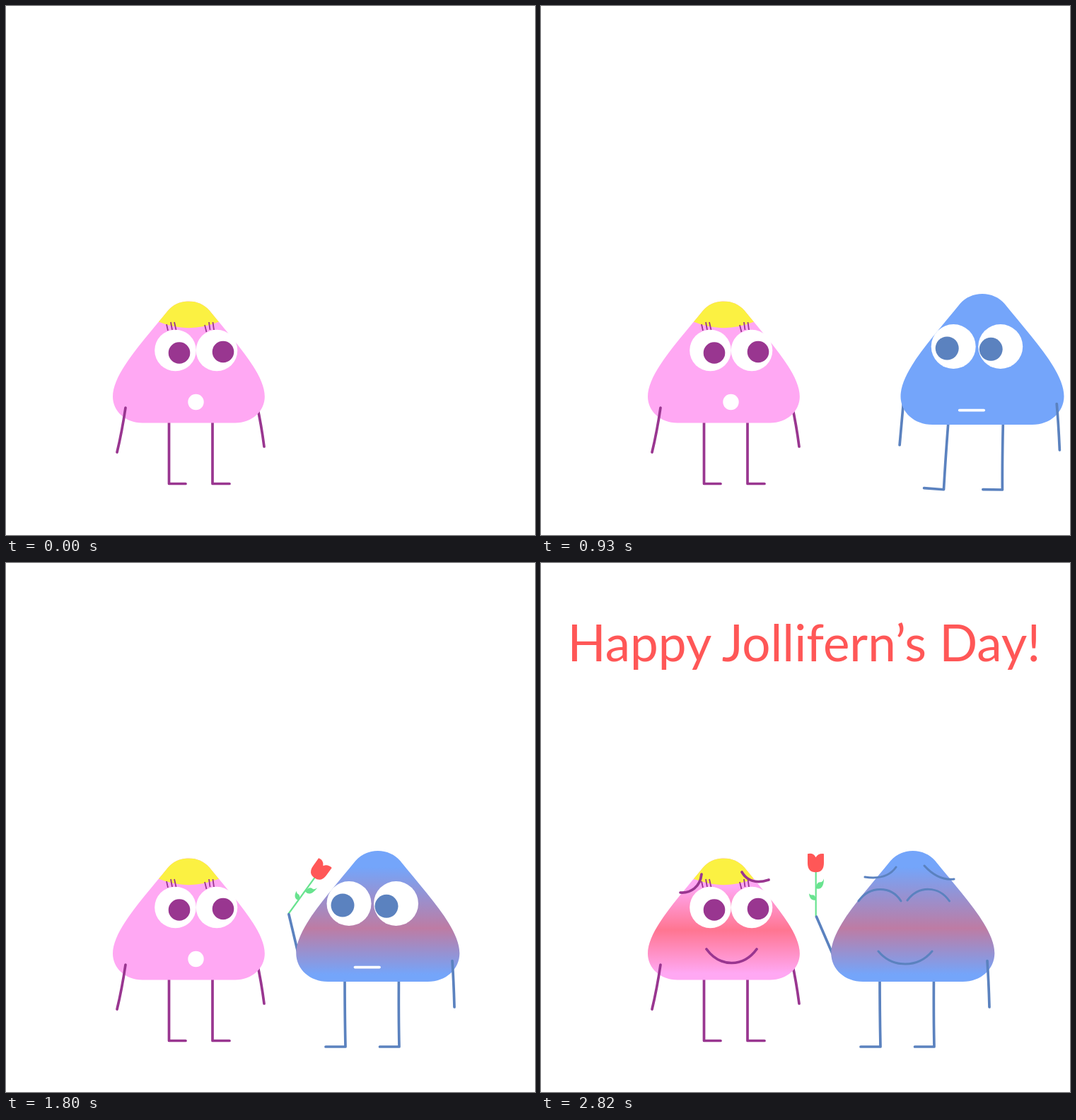
An HTML page for the animation above (4410 ms loop, 748x748 px).

```html
<!DOCTYPE html>
<html lang="en">
<head>
<meta charset="utf-8">
<title>Two friends and a flower</title>
<style>
  html, body { margin: 0; height: 100%; overflow: hidden; background: #fff; }
  svg { display: block; width: 100vw; height: 100vh; }
  .line { fill: none; stroke-width: 3.7; stroke-linecap: round; stroke-linejoin: round; }
  .purple { stroke: #993690; }
  .navy { stroke: #5b82bf; }
  .thin { stroke-width: 3; }
  text { font: 400 71px Lato, sans-serif; fill: #ff5757; text-anchor: middle; }
  stop { stop-color: #ff5757; }
</style>
</head>
<body>
<svg viewBox="0 0 748 748">
  <defs>
    <path id="body" d="M115.5 407C128 407 139 412 147 421C184 467 231 516 231 552C231 574 212 592 186 592H45C19 592 0 574 0 552C0 516 47 467 84 421C92 412 103 407 115.5 407Z"/>
    <clipPath id="bodyClip"><use href="#body"/></clipPath>
    <linearGradient id="blueGlow" gradientUnits="userSpaceOnUse" x1="0" y1="430" x2="0" y2="582">
      <stop offset="0" stop-opacity="0"/><stop offset=".57"/><stop offset="1" stop-opacity="0"/>
    </linearGradient>
    <linearGradient id="pinkGlow" gradientUnits="userSpaceOnUse" x1="0" y1="450" x2="0" y2="582">
      <stop offset="0" stop-opacity="0"/><stop offset=".5"/><stop offset="1" stop-opacity="0"/>
    </linearGradient>
  </defs>

  <text id="greeting" x="372" y="139">Happy Jollifern’s Day!</text>

  <g id="pink">
    <path class="line purple" d="M355 565Q361 592 365 623M230.5 580V675.5H254M292 580V675.5H316"/>
    <g transform="translate(151 417.5) scale(.93) translate(0 -407)">
      <use href="#body" fill="#ffa8f3"/>
      <use id="pinkBlush" href="#body" fill="url(#pinkGlow)"/>
      <path clip-path="url(#bodyClip)" fill="#fbf142" d="M0 400H231V438H162Q115.5 457 69 438H0Z"/>
    </g>
    <g fill="#fff"><circle cx="239.5" cy="487" r="29.3"/><circle cx="298" cy="487" r="29.3"/></g>
    <g fill="#993690"><circle cx="245" cy="490.5" r="15.3"/><circle cx="307" cy="489" r="15.3"/></g>
    <path class="purple" stroke-width="1.8" d="M227 450L229 459M233 447L235 458M238 447L240.5 458M281 451L283.5 461M287 447L288.5 458M292.5 447L294 458"/>
    <path class="line purple" d="M169 568Q164 602 157 631"/>
    <circle id="pinkCalm" cx="268.5" cy="560" r="11.2" fill="#fff"/>
    <path id="pinkHappy" class="line purple" d="M234 546C253 572 286 572 305 546M197 466C212 467 225 458 227 440M284 437C291 449 304 454 322 448"/>
  </g>

  <g id="blue">
    <path id="leg1" class="line navy" d="M479 580Q479 640 480 684L452 684"/>
    <path id="leg2" class="line navy" d="M555.5 580Q555 640 556 684H528.5"/>
    <g id="flower">
      <path d="M-.8 0V-64" stroke="#68e38f" stroke-width="2.2"/>
      <path fill="#68e38f" d="M-.8 -40C6 -38 10.5 -42 10.5 -54Q8.5 -48 5 -49Q0 -49 -.8 -40M-.8 -24C-6 -22 -10 -26 -10.5 -33Q-8 -30 -5 -31Q-1 -30 -.8 -24"/>
      <path fill="#ff5757" d="M-12.5 -89Q-4.5 -91 -1 -84Q2.5 -90 10.5 -89V-76Q10.5 -63 -1 -63Q-12.5 -63 -12.5 -76Z"/>
    </g>
    <path id="arm1" class="line navy" d="M414.5 558V621"/>
    <g transform="translate(410.3)">
      <use href="#body" fill="#74a5fa"/>
      <use id="blueBlush" href="#body" fill="url(#blueGlow)"/>
    </g>
    <g id="blueCalm">
      <g fill="#fff"><circle cx="485" cy="481.5" r="31.5"/><circle cx="551.5" cy="481.5" r="31.5"/></g>
      <g fill="#5b82bf"><circle cx="476" cy="484" r="16.5"/><circle cx="538" cy="485.3" r="16.5"/></g>
      <path class="line" stroke="#fff" d="M493.5 571.6H528"/>
    </g>
    <path id="blueHappy" class="line navy thin" d="M477 549C497 573 533 573 553 549M458 444C478 447 493 443 502 430M542 428C552 439 566 449 584 447M449 478C465 456 495 456 509 478M518 477C534 456 562 456 577.5 478"/>
    <path id="arm2" class="line navy" d="M631 562.5Q633 590 634 628"/>
  </g>
</svg>
<script>
  const LOOP = 4410, STEP = 30, WALK_END = 1460, RAD = Math.PI / 180;
  const SHOULDER = { x: 414.5, y: 558 }, ARM = 63, ARM_REST = 156.6;
  const $ = id => document.getElementById(id);
  const ramp = (t, from, to) => Math.min(1, Math.max(0, (t - from) / (to - from)));
  const smooth = p => p * p * (3 - 2 * p);
  const show = (id, on) => $(id).style.display = on ? "" : "none";
  const fade = (id, alpha) => $(id).setAttribute("opacity", alpha);
  const place = (id, transform) => $(id).setAttribute("transform", transform);
  const turn = (id, angle, x, y) => place(id, `rotate(${angle} ${x} ${y})`);

  // Eased value from [time, value] pairs
  function key(t, points) {
    let value = points[0][1];
    for (let i = 1; i < points.length; i++) {
      const [from] = points[i - 1], [to, next] = points[i];
      value += (next - points[i - 1][1]) * smooth(ramp(t, from, to));
    }
    return value;
  }

  const armSwing = [[120, -5], [300, 20], [480, 9.8], [630, 0], [780, 18], [930, 5.1],
    [1170, 21.2], [1400, 200], [1620, 200], [1800, 166.6], [1920, ARM_REST]];

  function draw(t) {
    // Walk in from the right
    const distance = 337 * (1 + Math.cos(Math.PI * ramp(t, 0, WALK_END))) / 2;
    place("blue", `translate(${distance})`);
    show("blue", t >= 120);

    const stride = Math.cos((62 + (t - 930) * 0.75) * RAD);
    const settle = 1 - smooth(ramp(t, 1170, WALK_END));
    turn("leg1", 9.5 * stride * settle, 479, 572);
    turn("leg2", (5.4 - 9.5 * stride) * settle, 555.5, 572);
    turn("arm2", key(t, [[930, -1], [1170, -15.3], [WALK_END, 0]]), 631, 562);

    // The flower is brought out from behind the body
    const arm = key(t, armSwing);
    const handX = SHOULDER.x - ARM * Math.sin(arm * RAD);
    const handY = SHOULDER.y + ARM * Math.cos(arm * RAD);
    turn("arm1", arm, SHOULDER.x, SHOULDER.y);
    place("flower", `translate(${handX} ${handY}) rotate(${Math.min(120, 3.6 * (arm - ARM_REST))})`);
    show("flower", t >= 1500);

    fade("blueBlush", 0.53 * ramp(t, 1500, 1800));
    fade("pinkBlush", 0.63 * ramp(t, 2040, 2370));
    fade("greeting", ramp(t, 2440, 2820));

    const pinkHappy = t >= 2220, blueHappy = t >= 2310;
    show("pinkCalm", !pinkHappy);
    show("pinkHappy", pinkHappy);
    show("blueCalm", !blueHappy);
    show("blueHappy", blueHappy);
  }

  const start = performance.now();
  function tick() {
    const t = (performance.now() - start) % LOOP;
    draw(t - t % STEP);
    requestAnimationFrame(tick);
  }
  tick();
</script>
</body>
</html>
```
